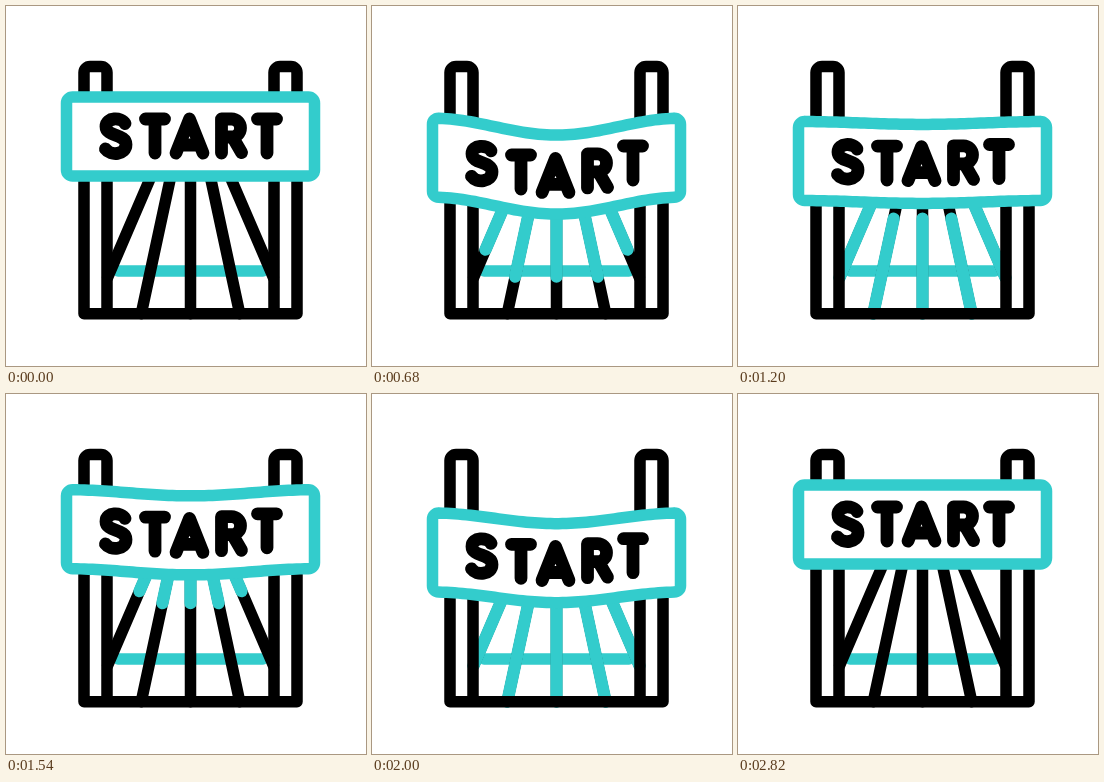
Animation, 360 px wide and 360 px high, one loop 3260 ms. Source, as an HTML page with a canvas:

```html
<!DOCTYPE html>
<html lang="en">
<head>
<meta charset="utf-8">
<title>Start line</title>
<style>
html, body { margin: 0; width: 100%; height: 100%; overflow: hidden; background: #fff; }
canvas { display: block; width: 360px; height: 360px; }
</style>
</head>
<body>
<canvas id="stage" width="360" height="360" role="img" aria-label="START"></canvas>
<script>
const ctx = document.getElementById('stage').getContext('2d');
const LOOP = 3260, TEAL = '#33cccc', BLACK = '#000', LINE = 11.5;
const MID = 184.5, FLOOR = 307.7, LANE_TOP = 160;

// Letter strokes, each centred on x = 0
const glyphs = {
  S: 'M9.5 117.5 C6 111 -9.5 111 -9.5 120.5 C-9.5 131 10.5 127.5 10.5 138.5 C10.5 149 -5 150 -10 143',
  T: 'M-9.5 113 H9.5 M0 113 V147',
  A: 'M-13.5 147 L0 113 L13.5 147 M-8 139 H8',
  R: 'M-10 147 V113 H0 A9 9 0 0 1 0 131 H-10 M1 131 L10 146.5'
};
const centres = [109.5, 149, 183.5, 225.5, 261];
const letters = [...'START'].map((c, i) => ({ x: centres[i], path: new Path2D(glyphs[c]) }));

// Smooth 0 to 1 between two times
function ease(t, from, to) {
  const p = Math.min(1, Math.max(0, (t - from) / (to - from)));
  return p * p * (3 - 2 * p);
}
const hump = (t, from, peak, to) => ease(t, from, peak) - ease(t, peak, to);

// Two falls, then a small leap that settles
const drop = t => 28 * (ease(t, 220, 900) - ease(t, 1150, 1380) + ease(t, 1380, 2000))
  - 37 * ease(t, 2060, 2400) + 9 * ease(t, 2400, 2820);
const sag = t => 17 * (hump(t, 220, 700, 1380) + hump(t, 1390, 1760, 2340))
  - 5.5 * hump(t, 2080, 2340, 2820);
const bend = x => (1 + Math.cos(Math.PI * (x - MID) / 124)) / 2;

function stroke(color, width, path) {
  ctx.strokeStyle = color;
  ctx.lineWidth = width;
  path ? ctx.stroke(path) : ctx.stroke();
}

// Five lanes fan out in perspective until they reach a post or the floor
function drawLanes(from, to, color, width) {
  if (to - from < 0.001) return;
  const spread = 17.5, slope = 0.215;
  ctx.beginPath();
  for (let i = -2; i <= 2; i++) {
    const reach = (83 / Math.abs(i) - spread) / slope;
    const length = Math.min(FLOOR - LANE_TOP, reach);
    const point = p => [MID + i * (spread + slope * length * p), LANE_TOP + length * p];
    ctx.moveTo(...point(from));
    ctx.lineTo(...point(to));
  }
  stroke(color, width);
}

function drawPosts() {
  const width = 23, inset = 106.5;
  ctx.beginPath();
  for (const x of [MID - inset, MID + inset - width]) {
    ctx.roundRect(x, 60.5, width, FLOOR - 60.5, [6, 6, 0, 0]);
  }
  ctx.moveTo(MID - inset, FLOOR);
  ctx.lineTo(MID + inset, FLOOR);
  stroke(BLACK, LINE);
}

function drawDots(t) {
  const radius = 6 * (1 - ease(t, 2420, 2620));
  if (t < 2200 || radius <= 0) return;
  const y = 100 - 86 * ease(t, 2200, 2477);
  ctx.fillStyle = TEAL;
  for (const side of [-1, 0, 1]) {
    ctx.beginPath();
    ctx.arc(180 + side * 33, y + Math.abs(side) * 7, radius, 0, Math.PI * 2);
    ctx.fill();
  }
}

function drawBanner(dy, s) {
  const left = 60.5, right = 308.5, top = 91 + dy, bottom = 170 + dy, r = 6;
  ctx.beginPath();
  for (let x = left + r; x <= right - r; x += 4) ctx.lineTo(x, top + s * bend(x));
  ctx.arcTo(right, top, right, bottom, r);
  ctx.arcTo(right, bottom, left, bottom, r);
  for (let x = right - r; x >= left + r; x -= 4) ctx.lineTo(x, bottom + s * bend(x));
  ctx.arcTo(left, bottom, left, top, r);
  ctx.arcTo(left, top, right, top, r);
  ctx.closePath();
  ctx.fillStyle = '#fff';
  ctx.fill();
  stroke(TEAL, LINE);

  for (const { x, path } of letters) {
    ctx.save();
    ctx.translate(x, dy + s * 1.08 * bend(x));
    stroke(BLACK, 12.8, path);
    ctx.restore();
  }
}

function draw(t) {
  ctx.fillStyle = '#fff';
  ctx.fillRect(0, 0, 360, 360);
  ctx.lineCap = ctx.lineJoin = 'round';

  ctx.beginPath();
  ctx.moveTo(112, 265);
  ctx.lineTo(257, 265);
  stroke(TEAL, LINE);

  drawLanes(0, 1, BLACK, LINE);
  drawLanes(ease(t, 1080, 1380), ease(t, 220, 905), TEAL, LINE + 0.8);
  drawLanes(0, ease(t, 1340, 1860) - ease(t, 2060, 2505), TEAL, LINE + 0.8);
  drawPosts();
  drawDots(t);
  drawBanner(drop(t), sag(t));
}

const began = performance.now();
function tick() {
  draw((performance.now() - began) % LOOP);
  requestAnimationFrame(tick);
}
tick();
</script>
</body>
</html>
```
